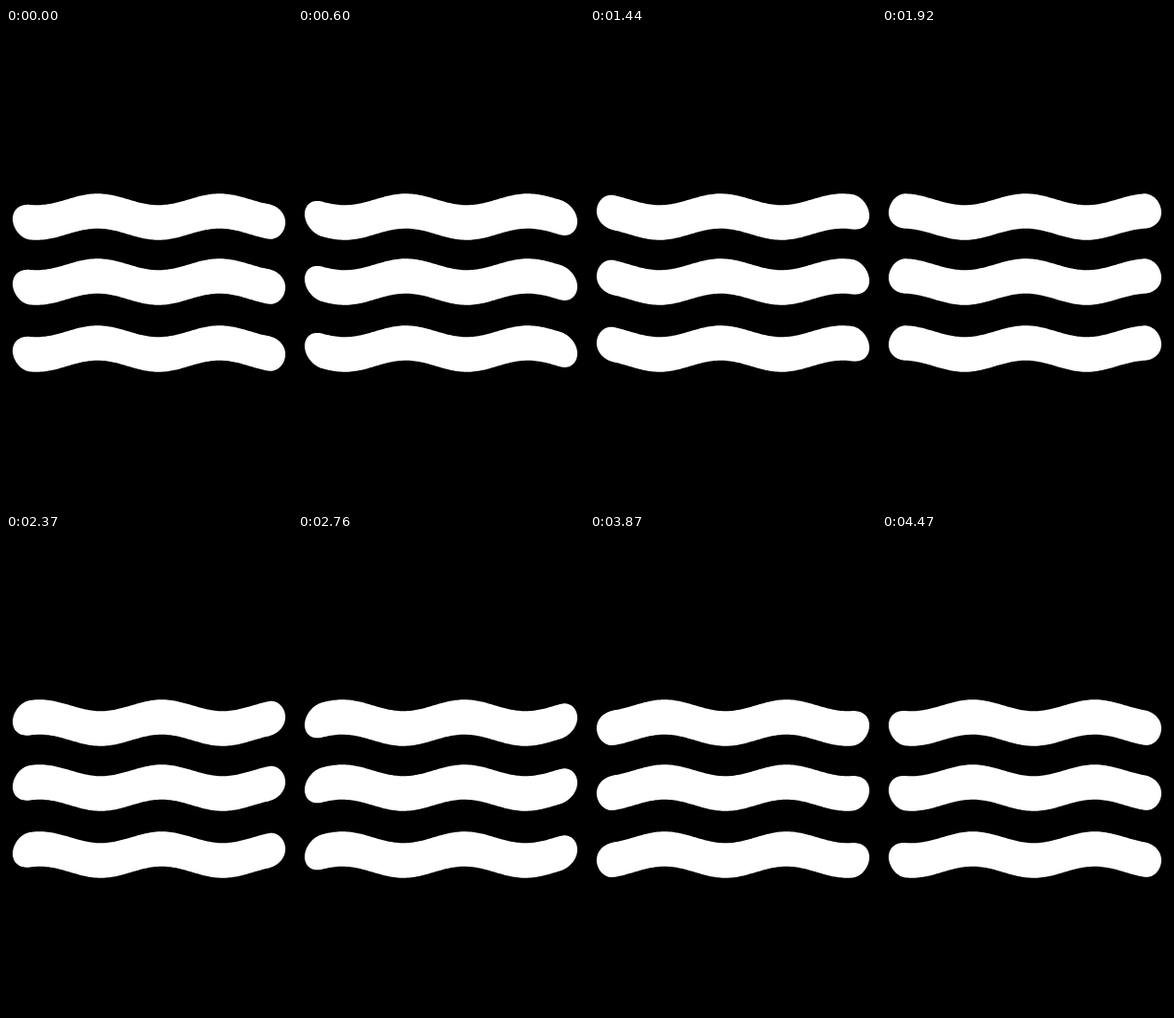
Recreate the animation shown at these times as an HTML page. Size 300 by 500 pixels, loop 4500 ms.

```html
<!DOCTYPE html>
<html lang="en">
<head>
<meta charset="utf-8">
<title>Waves</title>
<style>
  html, body { margin: 0; width: 100%; height: 100%; overflow: hidden; background: #000; }
  svg { display: block; width: 300px; height: 500px; }
</style>
</head>
<body>
<svg viewBox="0 0 300 500" fill="#fff">
  <defs><path id="bar"/></defs>
  <use href="#bar" y="197.5"/>
  <use href="#bar" y="265.5"/>
  <use href="#bar" y="335.5"/>
</svg>
<script>
const LOOP = 4500, STEP = 30;
const LEFT = 7, RIGHT = 293, R = 18.25;
const CREST = 96, LENGTH = 128, AMP = 6;
const bar = document.getElementById('bar');

// Outline of a straight pill centred on y = 0.
function pill() {
  const pts = [];
  const cap = (cx, from) => {
    for (let i = 0; i <= 40; i++) {
      const a = from + Math.PI * i / 40;
      pts.push([cx + R * Math.cos(a), R * Math.sin(a)]);
    }
  };
  const a = LEFT + R, b = RIGHT - R;
  for (let x = a; x < b; x += 2) pts.push([x, -R]);
  cap(b, -Math.PI / 2);
  for (let x = b; x > a; x -= 2) pts.push([x, R]);
  cap(a, Math.PI / 2);
  return pts;
}

const outline = pill();

// Each column of the pill is shifted up or down by a travelling wave.
function draw(ms) {
  const t = Math.floor((ms % LOOP) / STEP) * STEP;
  const crest = CREST + LENGTH * t / LOOP;
  const lift = x => AMP * Math.cos(2 * Math.PI * (x - crest) / LENGTH);
  const d = outline.map(([x, y]) => x.toFixed(2) + ' ' + (y - lift(x)).toFixed(2));
  bar.setAttribute('d', 'M' + d.join('L') + 'Z');
}

const start = performance.now();
function tick() {
  draw(performance.now() - start);
  requestAnimationFrame(tick);
}
tick();
</script>
</body>
</html>
```
